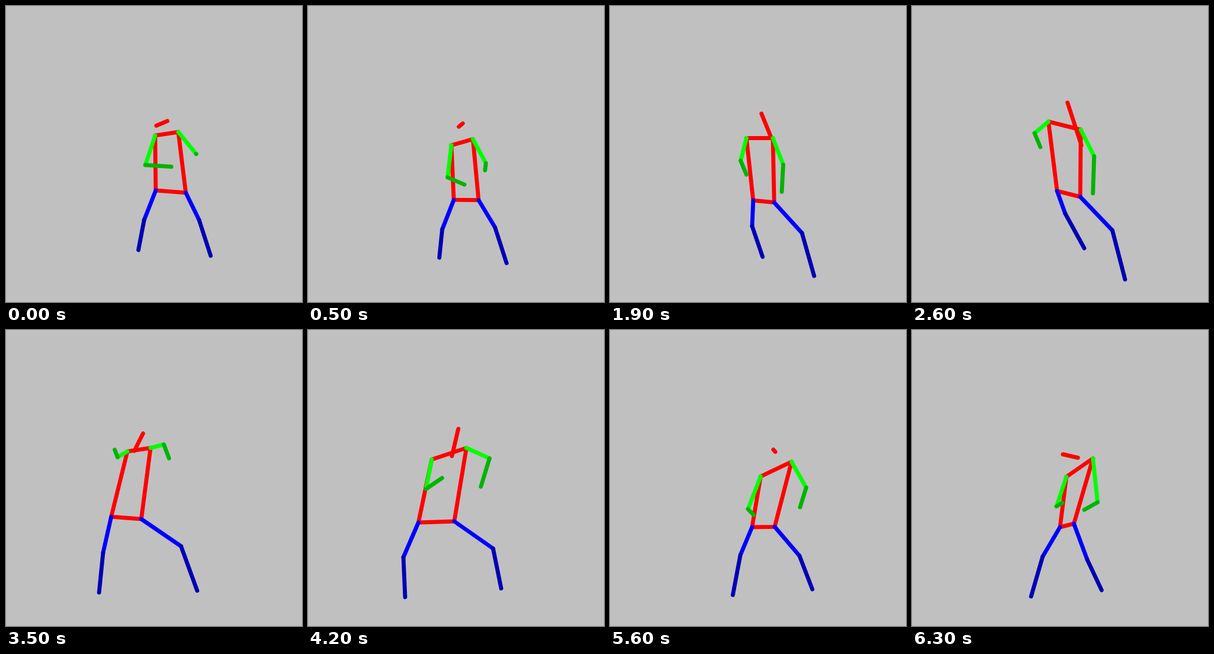
Recreate the animation shown at these times as an HTML page with a canvas. Size 512 by 512 pixels, loop 6400 ms.

```html
<!DOCTYPE html>
<html lang="en">
<head>
<meta charset="utf-8">
<title>Walking stick figure</title>
<style>
  html, body { margin: 0; width: 100%; height: 100%; overflow: hidden; background: #c0c0c0; }
  canvas { display: block; width: 512px; height: 512px; }
</style>
</head>
<body>
<canvas id="stage" width="512" height="512"></canvas>
<script>
const ctx = document.getElementById("stage").getContext("2d");
const LOOP = 6.4, STEP = 0.1;

// Moments, in seconds, at which the walk changes direction.
const BEATS = [0, 1.1, 2.6, 3.5, 4.2, 5, 6.3];

// Strength of a beat: 1 at its moment, fading to 0 at its neighbours.
function strength(i, t) {
  const at = BEATS[i];
  const near = BEATS[t < at ? i - 1 : i + 1] ?? at + Math.sign(t - at);
  return t === at ? 1 : Math.max(0, 1 - (t - at) / (near - at));
}

const add = (a, b) => [a[0] + b[0], a[1] + b[1]];
const subtract = (a, b) => [a[0] - b[0], a[1] - b[1]];

// A resting vector plus weighted reactions [weight, dx, dy].
const react = (rest, ...reactions) =>
  reactions.reduce((v, [w, dx, dy]) => add(v, [w * dx, w * dy]), rest);

function line(color, ...points) {
  ctx.strokeStyle = color;
  ctx.beginPath();
  points.forEach(p => ctx.lineTo(...p));
  ctx.stroke();
}

function limb(root, upper, lower) {
  const middle = add(root, upper);
  return [root, middle, add(middle, lower)];
}

function drawLimbs(limbs, upperColor, lowerColor) {
  for (const [root, middle] of limbs) line(upperColor, root, middle);
  for (const [, middle, end] of limbs) line(lowerColor, middle, end);
}

function draw(t) {
  const [start, dip, kick, raise, reach, rise, turn] = BEATS.map((_, i) => strength(i, t));
  const lean = raise + reach + rise + turn;
  const tall = kick + raise + reach;
  const open = reach + rise;
  const stride = Math.sin(Math.PI * (t / 6.3) ** 1.3);

  const pelvis = react([266, 325], [start, 19, -4], [dip, -6, 28], [kick, 5, 0],
    [raise, -58, 0], [reach, -44, 7], [rise, -3, 18], [turn, 2, 13]);
  const neck = add(pelvis, react([-7, -100], [lean, 29, 0], [tall, 0, -18]));

  const halfHip = react([26, 2], [dip, -10, -4], [kick, -6, 3], [reach, 5, -3], [turn, -14, -5]);
  const halfShoulder = react([20, -3], [dip, -3, -5], [kick, 8, 10], [open, 10, -7], [turn, 3, -13]);
  const hipL = subtract(pelvis, halfHip), hipR = add(pelvis, halfHip);
  const shoulderL = subtract(neck, halfShoulder), shoulderR = add(neck, halfShoulder);

  const crown = react([5, -40], [start, -4, 18], [dip, -4, -5], [raise, 2, 12],
    [open, 11, -3], [turn, -34, 17]);
  const chin = react([0, 0], [start, -18, -14], [dip, 9, -42], [kick, 29, 34],
    [raise, -8, 2], [reach, 5, 4], [rise, 0, -41], [turn, -3, -17]);

  const armL = limb(shoulderL,
    react([-17, 51], [dip, 23, 10], [kick, -7, -31], [raise, 0, -41], [reach, 7, 0], [rise, -9, 10]),
    react([10, 24], [start, 35, -21], [raise, -15, -37], [reach, 18, -43], [turn, 0, -30]));
  const armR = limb(shoulderR,
    react([23, 46], [start, 8, -8], [dip, -11, 0], [raise, 0, -52], [open, 17, -28], [turn, -15, 30]),
    react([0, 52], [start, 0, -52], [dip, -3, -25], [kick, -2, 12], [raise, 9, -28],
      [reach, -15, -3], [turn, -23, -39]));
  const legL = limb(hipL,
    react([-20, 51], [kick, 34, -12], [raise, 6, 11], [reach, -6, 9], [rise, 8, -5], [turn, -10, 0]),
    react([-7, 69], [start, -3, -17], [dip, 8, -24], [kick, 40, -9], [reach, 10, 0], [turn, -13, 0]));
  const legR = limb(hipR,
    react([23 + 46 * stride, 47], [kick, -6, 11], [rise, 0, -7], [turn, 0, 15]),
    react([20, 62], [kick, 2, 23], [raise, 8, 15], [reach, -6, 7], [turn, 5, -9]));

  ctx.fillStyle = "#c0c0c0";
  ctx.fillRect(0, 0, 512, 512);
  ctx.lineWidth = 7;
  ctx.lineCap = ctx.lineJoin = "round";
  line("#ff0000", add(neck, crown), add(neck, chin));
  line("#ff0000", shoulderL, shoulderR, hipR, hipL, shoulderL);
  drawLimbs([armL, armR], "#00ff00", "#00b400");
  drawLimbs([legL, legR], "#0000ff", "#0000b4");
}

const begin = performance.now();
function tick() {
  const elapsed = Math.max(0, performance.now() - begin) / 1000 % LOOP;
  draw(Math.floor(elapsed / STEP) * STEP);
  requestAnimationFrame(tick);
}
tick();
</script>
</body>
</html>
```
